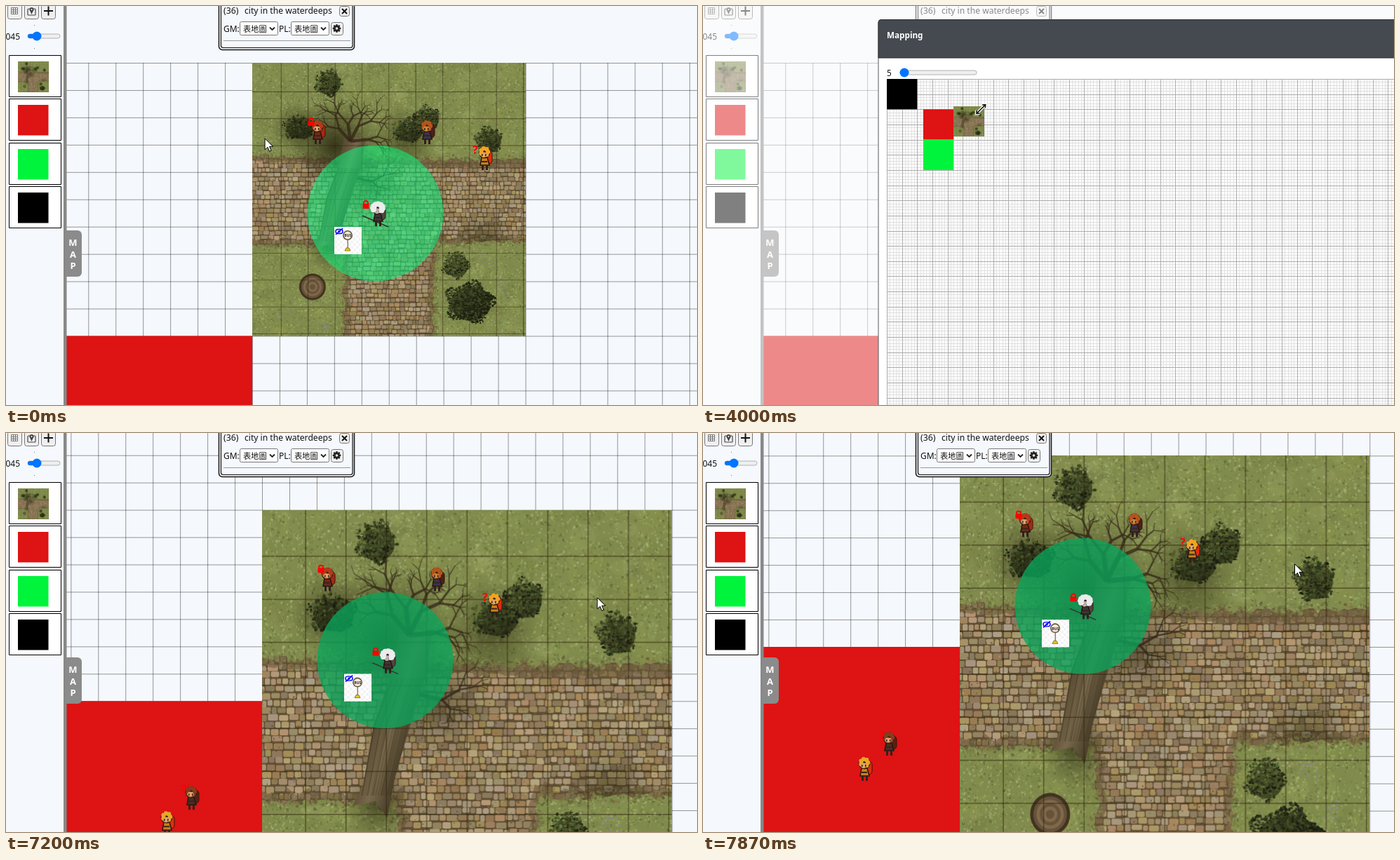
An HTML page with a canvas for the animation above (8070 ms loop, 985 by 569 pixels).

```html
<!DOCTYPE html>
<html lang="en">
<head>
<meta charset="utf-8">
<title>Map board</title>
<style>
html, body { margin: 0; width: 100%; height: 100%; overflow: hidden; background: #f5f8fc; }
canvas { display: block; }
</style>
</head>
<body>
<canvas id="stage" width="985" height="569"></canvas>
<script>
const LOOP = 8070, CELL = 38.95, UNIT = 4.33, TAU = Math.PI * 2;
const RED = '#de1313', GREEN = '#00f43b', PAPER = '#f5f8fc';
const SANS = '"Noto Sans", "Noto Sans CJK TC", sans-serif';
const c = document.getElementById('stage').getContext('2d');
c.imageSmoothingQuality = 'high';

let seed = 7;
const rnd = (a = 1, b = 0) => {
  seed = (seed * 16807) % 2147483647;
  return b + (a - b) * seed / 2147483647;
};
const tint = (hue, sat, dark, light, alpha = 1) =>
  `hsla(${hue + rnd(8, -8)},${sat + rnd(7, -7)}%,${rnd(light, dark)}%,${alpha})`;

const part = (t, from, to) => Math.min(1, Math.max(0, (t - from) / (to - from)));
// Goes to `end`, swinging past the straight way by `extra`
const swing = (p, end, extra) => end * p + extra * Math.sin(Math.PI * p);

// Linear interpolation through rows of [time, x, y]
function along(keys, t) {
  let i = 0;
  while (i < keys.length - 2 && t > keys[i + 1][0]) i++;
  const [a, b] = [keys[i], keys[i + 1]], p = part(t, a[0], b[0]);
  return [a[1] + (b[1] - a[1]) * p, a[2] + (b[2] - a[2]) * p];
}

function rect(x, y, w, h, fill, g = c) { g.fillStyle = fill; g.fillRect(x, y, w, h); }

function box(x, y, w, h, r, fill, line, lw = 1, g = c) {
  g.beginPath();
  g.roundRect(x, y, w, h, r);
  if (fill) { g.fillStyle = fill; g.fill(); }
  if (line) { g.strokeStyle = line; g.lineWidth = lw; g.stroke(); }
}

function oval(x, y, rx, ry, fill, g = c) {
  g.beginPath();
  g.ellipse(x, y, rx, ry, 0, 0, TAU);
  g.fillStyle = fill;
  g.fill();
}

function poly(points, fill, line, lw = 1, g = c) {
  g.beginPath();
  points.forEach(p => g.lineTo(...p));
  if (fill) { g.closePath(); g.fillStyle = fill; g.fill(); }
  if (line) { g.strokeStyle = line; g.lineWidth = lw; g.stroke(); }
}

function text(s, x, y, size, fill = '#111', weight = 400) {
  c.font = `${weight} ${size}px ${SANS}`;
  c.fillStyle = fill;
  c.fillText(s, x, y);
}

// ---- battle map, in a 390 x 390 space ----
function bush(g, x, y, r, light, ry = r) {
  oval(x + 2, y + 2, r * .85, ry * .85, 'rgba(25,30,10,.6)', g);
  for (let i = 0; i < r * ry; i++) {
    const a = rnd(TAU), d = Math.sqrt(rnd()) * (1 + .13 * Math.sin(a * 5 + x));
    const glow = light - 7 * (Math.cos(a) + Math.sin(a)) * d;
    oval(x + Math.cos(a) * d * r, y + Math.sin(a) * d * ry, rnd(1.9, .5), rnd(1.6, .5), tint(76, 32, 8, glow), g);
  }
}

function branch(g, x, y, angle, len, w) {
  if (w < .5) return;
  const x2 = x + Math.cos(angle) * len, y2 = y + Math.sin(angle) * len;
  poly([[x, y], [x2, y2]], null, 'rgba(52,40,24,.8)', w, g);
  branch(g, x2, y2, angle + rnd(.9, 0), len * rnd(.9, .5), w * .68);
  branch(g, x2, y2, angle - rnd(.9, 0), len * rnd(.9, .5), w * .6);
}

function shade(g, x, y, r, alpha) {
  const f = g.createRadialGradient(x, y, 0, x, y, r);
  f.addColorStop(0, `rgba(38,34,14,${alpha})`);
  f.addColorStop(1, 'rgba(38,34,14,0)');
  oval(x, y, r, r, f, g);
}

// Breaks the sides of a shape into small uneven steps
function ragged(corners, amount) {
  return corners.flatMap(([x, y], i) => {
    const [x2, y2] = corners[(i + 1) % corners.length];
    const n = Math.ceil(Math.hypot(x2 - x, y2 - y) / 5);
    return Array.from({ length: n }, (_, k) =>
      [x + (x2 - x) * k / n + rnd(amount, -amount), y + (y2 - y) * k / n + rnd(amount, -amount)]);
  });
}

function paintRoad(g) {
  const road = ragged([[-9, 131], [130, 138], [400, 139], [400, 256], [262, 256], [257, 400], [132, 400], [130, 262], [-9, 259]], 3);
  g.save();
  poly(road, '#5f4e34', null, 1, g);
  g.clip();
  for (let y = 118; y < 390; y += 6.4)
    for (let x = -rnd(8), w; x < 390; x += w) {
      w = rnd(11, 5);
      box(x, y + rnd(1.2), w - .9, rnd(6, 4.6), 1.3, tint(38, 24, 44, 60), null, 1, g);
    }
  poly(road, null, 'rgba(98,78,50,.5)', 14, g);
  rect(240, 136, 150, 14, 'rgba(105,85,58,.55)', g);
  shade(g, 330, 250, 45, .45);
  for (let i = 0; i < 3500; i++)
    rect(rnd(390), rnd(390, 120), rnd(1.8), rnd(1.8), rnd() < .5 ? 'rgba(60,45,25,.45)' : 'rgba(200,180,140,.35)', g);
  g.restore();
  for (const [x, y] of road)
    for (let k = 0; k < 8; k++)
      oval(x + rnd(6, -6), y + rnd(6, -6), rnd(1.8, .5), rnd(1.8, .5), tint(56, 28, 26, 44, .6), g);
}

function paintTree(g) {
  shade(g, 118, 118, 66, .8);
  shade(g, 63, 92, 36, .6);
  shade(g, 218, 108, 46, .55);
  shade(g, 170, 172, 48, .5);
  shade(g, 110, 264, 34, .5);
  bush(g, 66, 92, 23, 24, 17);
  const bark = g.createLinearGradient(98, 220, 134, 232);
  bark.addColorStop(0, '#5b4c35');
  bark.addColorStop(.4, '#78694c');
  bark.addColorStop(1, '#453a26');
  poly([[86, 264], [96, 246], [106, 192], [122, 150], [132, 105], [162, 108], [155, 150], [141, 192], [126, 240],
    [119, 275], [108, 260]], bark, null, 1, g);
  for (let i = 0; i < 22; i++)
    poly([[95 + i * 1.3, 255], [107 + i * 1.5, 192], [124 + i * 1.3, 150]], null, `rgba(35,26,12,${rnd(.5)})`, .7, g);
  for (const a of [-2.3, -1.7, -1.1, -.1]) branch(g, 140, 112, a, 24, 4.5);
  branch(g, 150, 165, .2, 22, 3.5);
}

function paintMap() {
  const sheet = document.createElement('canvas');
  sheet.width = 585;
  sheet.height = 624;
  const g = sheet.getContext('2d');
  g.scale(1.5, 1.6);
  rect(0, 0, 390, 390, '#808b4d', g);
  for (let i = 0; i < 500; i++)
    oval(rnd(390), rnd(390), rnd(16, 4), rnd(12, 4), tint(68, 32, 28, 64, .13), g);
  for (let i = 0; i < 16000; i++)
    rect(rnd(390), rnd(390), rnd(2.4, .6), rnd(2.4, .6), tint(70, 32, 24, 70, .5), g);
  paintRoad(g);
  paintTree(g);
  bush(g, 108, 28, 19, 33);
  bush(g, 222, 96, 23, 27, 17);
  bush(g, 249, 79, 18, 32);
  bush(g, 337, 110, 19, 32);
  bush(g, 290, 288, 19, 36);
  bush(g, 310, 342, 34, 18, 29);
  for (let r = 19; r > 2; r -= 3)
    oval(86, 320, r, r, r > 16 ? '#41331f' : r % 2 ? '#80694a' : '#66523a', g);
  for (const [x, y] of [[332, 281], [357, 317], [45, 357], [101, 372]])
    for (let i = 0; i < 9; i++) oval(x + rnd(8, -8), y + rnd(7, -7), 1.3, 1, '#85848c', g);
  for (let d = 41; d < 390; d += 38.4) {
    rect(d, 0, .9, 390, 'rgba(45,35,12,.6)', g);
    rect(0, d, 390, .9, 'rgba(45,35,12,.6)', g);
  }
  return sheet;
}
const map = paintMap();

// ---- tokens ----
function person(x, y, hair, coat, cape, skin = '#e0a468') {
  c.save();
  c.translate(x, y);
  box(1, -11, 10, 19, 5, cape, '#3a140a');
  poly([[-4, -1], [4, -1], [7, 10], [-6, 10]], coat, '#251610', 1.5);
  rect(-4, 10, 3, 7, '#33201a');
  rect(2, 10, 3, 7, '#33201a');
  oval(0, -8, 8.5, 8.5, '#3d1d12');
  for (let i = 0; i < 7; i++) oval(5 * Math.cos(i * .9), -9 + 5 * Math.sin(i * .9), 3.2, 3.2, hair);
  oval(-1, -5, 4.5, 3.4, skin);
  rect(-4, -6, 1.5, 3, '#222');
  rect(1, -6, 1.5, 3, '#222');
  rect(-4, 4, 8, 2, '#3a2418');
  c.restore();
}

function lock(x, y) {
  box(x - 4.5, y - 1, 9, 7, 1, '#f00');
  box(x - 3, y - 5, 6, 7, 3, null, '#f00', 1.8);
}

function hero(x, y) {
  poly([[x - 22, y + 2], [x + 15, y + 18]], null, '#333', 1.5);
  person(x, y, '#ececee', '#3a3836', '#4c4843', '#b9b0aa');
  for (let a = 2.6; a < 7; a += .55) oval(x + 7 * Math.cos(a), y - 9 + 6 * Math.sin(a), 4, 3.4, '#ececee');
}

function sign(x, y) {
  rect(x, y, 39, 39, '#fff');
  for (let i = 0; i < 100; i++)
    if ((i + (i / 10 | 0)) % 2) rect(x + i % 10 * 3.9, y + (i / 10 | 0) * 3.9, 3.9, 3.9, '#f3f3f3');
  rect(x + 18.5, y + 18, 1.5, 13, '#8a8074');
  poly([[x + 17, y + 30], [x + 21, y + 30], [x + 23, y + 34], [x + 15, y + 34]], '#e9c51d', '#7d6a12', .8);
  oval(x + 19, y + 12, 7, 7, '#655746');
  oval(x + 19, y + 12, 5.4, 5.4, '#f4ead6');
  text('BUS', x + 14.3, y + 14.3, 5, '#222', 700);
  box(x + 2, y + 3.5, 10, 6, 3, null, '#00f', 1.4);
  oval(x + 7, y + 6.5, 1.7, 1.7, '#00f');
  poly([[x + 2, y + 11], [x + 12, y + 2]], null, '#00f', 1.6);
}

// ---- the board under everything ----
function board(ox, oy, late) {
  for (let x = ox % CELL; x < 985; x += CELL) rect(x, Math.max(0, oy), 1, 569, 'rgba(0,0,0,.4)');
  for (let y = oy; y < 569; y += CELL) rect(86, y, 900, 1, 'rgba(0,0,0,.4)');
  const side = 10 * CELL, ry = oy + side;
  rect(ox - side, ry, side, side, RED);
  text('?', ox - 115, ry + 132, 16, '#f00', 700);
  person(ox - 101, ry + 138, '#8a3a20', '#4c2d22', '#5a2013');
  person(ox - 136, ry + 174, '#e9a726', '#c9801e', '#d8320f');

  const y = late ? oy + 3 * CELL : oy;
  c.drawImage(map, ox, y, CELL * (late ? 15 : 10), CELL * (late ? 16 : 10));
  oval(ox + 175.5, y + 214.5, 97, 97, late ? 'rgba(8,168,92,.76)' : 'rgba(0,255,130,.5)');
  person(ox + 93, y + 99, '#b53a1a', '#6b2b1b', '#a52a12');
  lock(ox + 84, y + 84);
  person(ox + 249, y + 99, '#b4541c', '#3a3350', '#4b2018', '#c98436');
  person(ox + 331, y + 136, '#f0a422', '#c9801c', '#e22c10');
  text('?', ox + 314, y + 130, 16, '#f00', 700);
  hero(ox + 179, y + 216);
  lock(ox + 162, y + 202);
  sign(ox + 117, y + 234);
}

// ---- controls ----
function slider(x, y, w, thumb) {
  box(x, y - 3, w, 6, 3, '#efefef', '#b2b2b2');
  box(x, y - 3, thumb - x, 6, 3, '#0075ff');
  oval(thumb, y, 6.5, 6.5, '#0075ff');
}

function button(x, y, w, h) { box(x + .5, y + .5, w, h, 3, '#efefef', '#767676'); }

function sidebar() {
  rect(0, 0, 82, 569, PAPER);
  rect(82, 0, 4.5, 569, '#888');
  for (const x of [2, 26, 50]) button(x, -3, 20, 21);
  for (let i = 0; i < 9; i++) box(7.5 + i % 3 * 3, 2.5 + (i / 3 | 0) * 3, 3, 3, 0, null, '#777');
  box(31, 4, 11, 9, 1, null, '#444', 1.2);
  poly([[36.5, 12], [33.5, 5], [39.5, 5]], '#444');
  oval(36.5, 5, 3, 3, '#444');
  oval(36.5, 5, 1, 1, '#fff');
  rect(54, 6, 13, 2, '#111');
  rect(59.5, .5, 2, 13, '#111');
  rect(40, 27, 1, 1, '#777');
  rect(40, 60, 1, 1, '#777');
  text('045', -.5, 48, 12);
  slider(31, 43, 46, 44);
  [null, RED, GREEN, '#000'].forEach((fill, i) => {
    const y = Math.round(70 + i * 62.3);
    box(4.5, y + .5, 74, 59, 0, '#fff', '#000');
    if (fill) rect(17, y + 9, 43.5, 43.5, fill);
    else c.drawImage(map, 17, y + 9, 43.5, 43.5);
  });
  box(85, 320, 23, 66, [0, 6, 6, 0], '#8b8b8b');
  c.textAlign = 'center';
  [...'MAP'].forEach((s, i) => text(s, 95.5, 342 + i * 16.5, 13, '#fff', 600));
  c.textAlign = 'left';
}

function select(x) {
  box(x + .5, 22.5, 54, 19, 2, '#fff', '#767676');
  text('表地圖', x + 5, 36.5, 11.2);
  poly([[x + 43, 30.5], [x + 46.5, 34], [x + 50, 30.5]], null, '#222', 1.8);
}

function infoBox() {
  box(303.5, -10, 193, 72.5, 5, PAPER, '#111', 1.5);
  box(306.5, -10, 187.5, 69.5, 3, null, '#111', 1.2);
  text('(36)', 310, 11, 12.3);
  text('city in the waterdeeps', 340, 11, 12.1);
  button(475, 0, 14, 14);
  poly([[479, 4], [486, 11]], null, '#111', 2);
  poly([[486, 4], [479, 11]], null, '#111', 2);
  text('GM:', 310, 37, 12);
  select(333);
  text('PL:', 389, 37, 12);
  select(406);
  button(463, 23, 17, 18);
  for (let a = 0; a < TAU; a += TAU / 8) oval(471.5 + 4.6 * Math.cos(a), 32 + 4.6 * Math.sin(a), 1.4, 1.4, '#222');
  oval(471.5, 32, 4.4, 4.4, '#222');
  oval(471.5, 32, 1.8, 1.8, '#efefef');
  rect(310, 49, 181, 1, '#999');
}

// ---- dialog; the map tile is measured in UNITs ----
function tileAt(t) {
  const first = part(t, 2230, 2930), second = part(t, 3200, 3670), pull = part(t, 4270, 4870);
  return {
    dx: swing(first, 0, 1) + swing(second, 0, 3),
    dy: swing(first, 0, 9) + swing(second, 9, 6),
    w: 10 + swing(pull, 5, 3.6),
    up: swing(pull, 6, 3)
  };
}

function tile(col, row, w, h, fill) {
  const area = [262 + col * UNIT, 104 + row * UNIT, w * UNIT, h * UNIT];
  if (fill) rect(...area, fill);
  else c.drawImage(map, ...area);
}

function modal(t) {
  rect(0, 0, 985, 569, 'rgba(255,255,255,.5)');
  box(250, 19.5, 750, 600, 4, '#fff', '#55595e');
  box(250, 19.5, 750, 54.5, [4, 0, 0, 0], '#454a50', '#2b2e32');
  text('Mapping', 262, 45.5, 11.7, '#fff', 700);
  text('5', 262, 99.5, 11.7);
  slider(281, 95, 109, 287);
  for (const [step, ink] of [[1, '#e0e0e0'], [5, '#acacac']])
    for (let i = 0; i < 168; i += step) {
      const d = Math.round(i * UNIT);
      rect(262 + d, 104, 1, 465, ink);
      rect(262, 104 + d, 723, 1, ink);
    }
  tile(0, 0, 10, 10, '#000');
  tile(12, 10, 10, 10, RED);
  tile(12, 20, 10, 10, GREEN);
  const { dx, dy, w, up } = tileAt(t), lift = Math.round(up);
  tile(22 + Math.round(dx), Math.round(dy) - lift, Math.round(w), 10 + lift);
}

// ---- pointer ----
function pointerAt(t, ox, oy) {
  if (t < 1270) return along([[0, 368, 188], [330, 549, 305], [870, 38, 9]], t);
  if (t < 2070) return along([[1270, 38, 9], [1730, 445, 153], [1930, 371, 118]], t);
  const { dx, dy, w, up } = tileAt(t);
  if (t < 3870) return [371 + dx * UNIT, 118 + dy * UNIT];
  if (t < 5420) return [353 + w * UNIT, 147 - up * UNIT];
  if (t < 6270) return along([[5420, 418, 121], [5670, 821, 104]], t);
  return [834 + (ox - 351) * .6, 289 + (oy - 81) * .62];
}

function arrows(x, y, turn, n) {
  for (const [ink, w] of [['#fff', 4], ['#111', 1.6]])
    for (let i = 0; i < n; i++) {
      c.save();
      c.translate(x, y);
      c.rotate(turn + i * TAU / n);
      poly([[0, 0], [0, -8]], null, ink, w);
      poly([[-3, -5.5], [0, -9], [3, -5.5]], null, ink, w);
      c.restore();
    }
}

function cursor(t, ox, oy) {
  if (t >= 5670 && t < 6270) return;
  const [x, y] = pointerAt(t, ox, oy);
  if (t >= 1930 && t < 3870) return arrows(x, y, 0, 4);
  if (t >= 3870 && t < 5470) return arrows(x, y, TAU / 8, 2);
  poly([[0, 0], [0, 16], [4, 12.5], [6.5, 18.5], [9, 17.5], [6.5, 11.5], [11.5, 11.5], [0, 0]]
    .map(p => [x + .5 + p[0], y + .5 + p[1]]), '#fff', '#000');
}

const pan = [[6670, 351, 81], [7200, 365, -7], [7470, 366, -69], [7670, 366, -84.5]];

function draw(t) {
  const [ox, oy] = along(pan, t);
  const scene = () => {
    rect(0, 0, 985, 569, PAPER);
    board(ox, oy, t >= 6270);
    sidebar();
    infoBox();
  };
  scene();
  if (t >= 1070 && t < 6270) modal(t);
  if (t >= 1070 && t < 1130) {
    // half-way through the fade
    c.globalAlpha = .5;
    scene();
    c.globalAlpha = 1;
  }
  cursor(t, ox, oy);
}

const start = performance.now();
(function tick() {
  draw((performance.now() - start) % LOOP);
  requestAnimationFrame(tick);
})();
</script>
</body>
</html>
```
